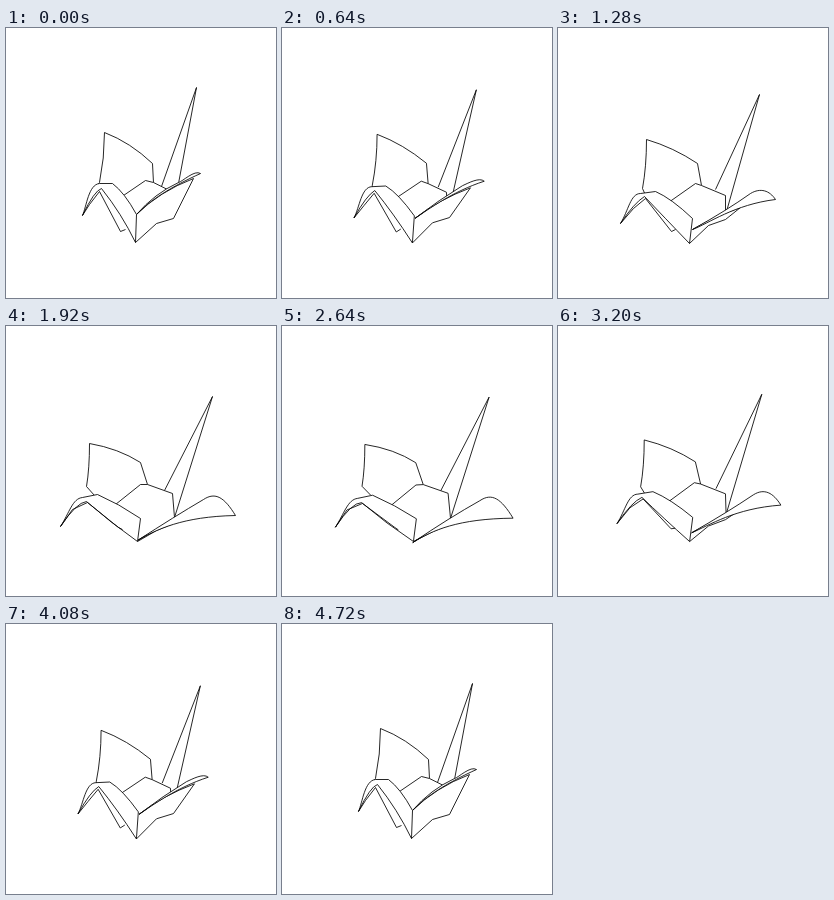
These frames come from a looping animation (270x270 px, 4800 ms). An HTML page:

```html
<!DOCTYPE html>
<html lang="en">
<head>
<meta charset="utf-8">
<title>Paper crane</title>
<style>
  html, body { margin: 0; height: 100%; overflow: hidden; background: #fff; }
  svg { display: block; width: 100vw; height: 100vh; }
  path { fill: #fff; stroke: #000; stroke-width: 0.85; stroke-linejoin: bevel; }
  .line { fill: none; }
</style>
</head>
<body>
<svg id="crane" viewBox="0 0 270 270"></svg>
<script>
const LOOP = 4800, STEP = 80;
const MID = 0.578, LOW = 0.919; // flap amounts of the second and third pose

// Each part, back to front: wing raised, half way, nearly down.
const parts = {
  farWing: [
    'M91 157L93 154Q98 130 98 104Q124 114 146 135L147 154',
    'M88 169L84 160Q88 138 88 111Q115 119 139 135L143 157',
    'M88 169L80 160Q83 142 83 117Q112 122 134 136L141 158'
  ],
  tail: [
    'M155 158L190 59L172 155',
    'M157 161L201 66L168 183',
    'M158 164L206 70L168 191'
  ],
  back: [
    'M117 167L139 152L147 154L161 161L163 180',
    'M110 174L137 155L143 157L167 167L167 184',
    'M109 178L134 158L141 158L166 167L168 191'
  ],
  side: [
    'M129 214L150 195L167 190L187 150Q153 163 130 186',
    'M131 215L150 197L167 191L182 179Q160 186 134 201',
    'M131 215L150 204L167 197L168 196Q160 196 131 214'
  ],
  nearWing: [
    'M130 186C143 172 165 158 194 145C188 141 176 153 172 154Q148 165 130 186',
    'M134 201C150 195 176 176 217 171C211 162 202 159 192 165Q168 182 134 201',
    'M131 214C150 203 176 190 229 189C218 171 209 165 197 173Q168 190 131 214'
  ],
  neck: [
    'M76 187C80 178 82 156 93 155L106 155Q118 164 130 186L129 214Q115 185 95 160Q88 162 76 187',
    'M62 195C70 182 72 165 82 165L97 163Q113 170 134 190L131 215Q105 188 86 168Q76 174 62 195',
    'M54 200C63 186 66 172 76 171L91 168Q112 177 134 192L131 215Q104 196 80 175Q70 176 54 200'
  ],
  chin: [
    'M76 187L83 176L93 163L114 203L119 201',
    'M62 195L75 180L87 170L113 203L117 201',
    'M54 200L66 183L81 176L112 201L116 203'
  ]
};

const svg = document.getElementById('crane');
const numbers = d => d.match(/\d+/g).map(Number);

const shapes = Object.entries(parts).map(([name, poses]) => {
  const el = document.createElementNS('http://www.w3.org/2000/svg', 'path');
  if (name === 'farWing' || name === 'chin') el.setAttribute('class', 'line');
  svg.append(el);
  return { el, form: poses[0], poses: poses.map(numbers) };
});

// Quadratic through the three poses.
function blend(a, b, c, s) {
  const k = (b - a) / MID;
  const bend = ((c - b) / (LOW - MID) - k) / LOW;
  return a + k * s + bend * s * (s - MID);
}

function draw(now) {
  const t = Math.floor((now % LOOP) / STEP) * STEP + STEP / 2;
  const s = (1 - Math.cos(2 * Math.PI * t / LOOP)) / 2;
  for (const { el, form, poses: [a, b, c] } of shapes) {
    let i = 0;
    el.setAttribute('d', form.replace(/\d+/g, () => {
      const v = blend(a[i], b[i], c[i], s) + 0.5;
      i++;
      return v.toFixed(2);
    }));
  }
}

let start;
function tick(now) {
  start ??= now;
  draw(now - start);
  requestAnimationFrame(tick);
}
draw(0);
requestAnimationFrame(tick);
</script>
</body>
</html>
```
